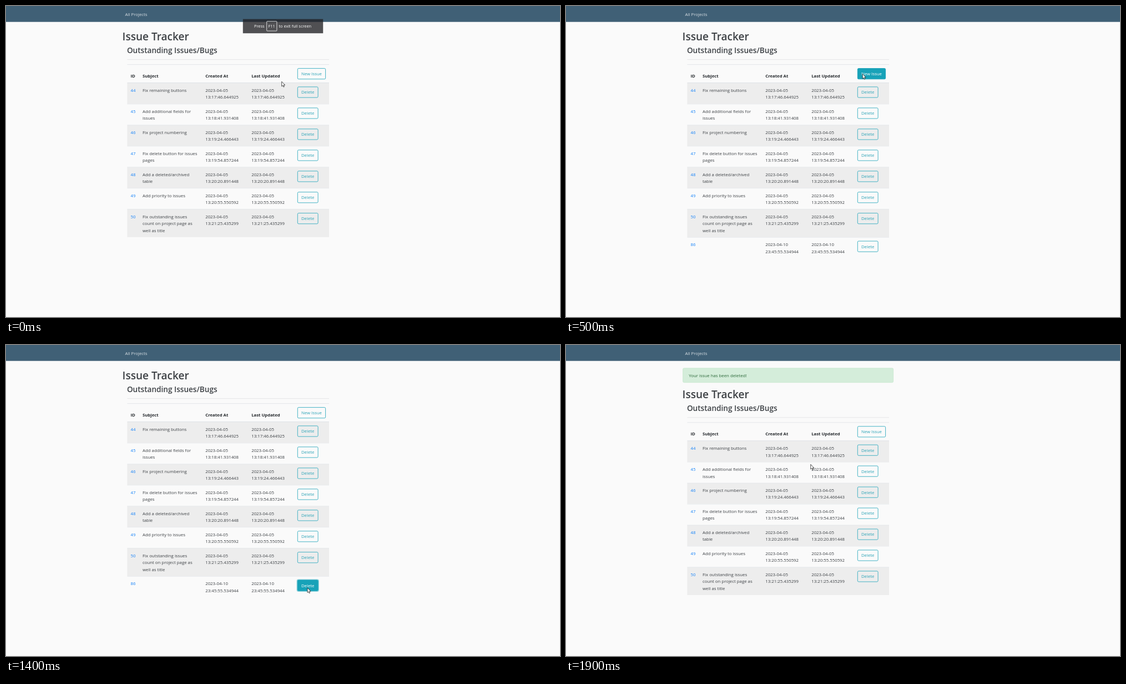
Write an HTML page that moves like this. It is 998x561 px and loops after 2 s.

```html
<!DOCTYPE html>
<html lang="en">
<head>
<meta charset="utf-8">
<title>Issue Tracker</title>
<style>
  html, body { margin: 0; width: 100%; height: 100%; overflow: hidden; background: #fafafa; }
  svg { display: block; }
  text { font: 7.82px "Open Sans", "Noto Sans", sans-serif; fill: #3d4145; white-space: pre; }
  .title { font-size: 19.05px; font-weight: 600; }
  .sub { font-size: 13.6px; font-weight: 600; }
  .head { font-size: 7.76px; font-weight: 700; fill: #25292d; }
  .link { fill: #1783f8; }
  .nav { fill: #d9e0e5; }
  .note { fill: #2b6839; }
  .tip { font-size: 7.4px; fill: #fff; }
  .btn rect { fill: transparent; stroke: #32abbf; stroke-width: .9; }
  .btn text { fill: #2ba3b7; }
  .btn.hover rect { fill: #17a2b8; stroke: #17a2b8; }
  .btn.hover text { fill: #fff; }
  .btn .halo, .btn.hover .halo { fill: #8bd0db; stroke: none; visibility: hidden; }
  .btn.focus .halo { visibility: visible; }
</style>
</head>
<body>
<svg id="stage" width="998" height="561" viewBox="0 0 998 561" xmlns="http://www.w3.org/2000/svg"></svg>
<script>
(() => {
  const NS = "http://www.w3.org/2000/svg";
  const stage = document.getElementById("stage");

  function el(parent, tag, attrs = {}, content) {
    const node = document.createElementNS(NS, tag);
    for (const key in attrs) node.setAttribute(key, attrs[key]);
    if (content !== undefined) node.textContent = content;
    parent.appendChild(node);
    return node;
  }
  const group = (parent, cls = "") => el(parent, "g", { class: cls });
  const rect = (parent, x, y, width, height, fill, more = {}) =>
    el(parent, "rect", { x, y, width, height, fill, ...more });
  const label = (parent, x, y, str, cls = "") => el(parent, "text", { x, y, class: cls }, str);

  function button(parent, y, width, str) {
    const g = group(parent, "btn");
    const x = 525.3, height = 19.2;
    rect(g, x - 1.7, y - 1.7, width + 3.4, height + 3.4, "none", { rx: 3, class: "halo" });
    rect(g, x, y, width, height, "none", { rx: 1.9 });
    label(g, x + 6.6, y + 12.5, str);
    return { g, x, y, width, height };
  }

  const LINE = 12.48, PAD = 13, EDGE = "#dee2e6";
  const issues = [
    [44, ["Fix remaining buttons"], "2023-04-05", "13:17:46.644925"],
    [45, ["Add additional fields for", "issues"], "2023-04-05", "13:18:41.931408"],
    [46, ["Fix project numbering"], "2023-04-05", "13:19:24.466443"],
    [47, ["Fix delete button for issues", "pages"], "2023-04-05", "13:19:54.857244"],
    [48, ["Add a deleted/archived", "table"], "2023-04-05", "13:20:20.891448"],
    [49, ["Add priority to issues"], "2023-04-05", "13:20:55.550592"],
    [50, ["Fix outstanding issues", "count on project page as", "well as title"], "2023-04-05", "13:21:25.435299"],
    [86, [], "2023-04-10", "23:45:55.534944"]
  ];

  rect(stage, 0, 0, 998, 561, "#fafafa");
  rect(stage, 0, 0, 998, 28.7, "#406076");
  label(stage, 214.6, 17.7, "All Projects", "nav");

  const alertBox = group(stage);
  rect(alertBox, 210.6, 41.8, 379, 25.8, "#d4edda", { rx: 2, stroke: "#c3e6cb", "stroke-width": .7 });
  label(alertBox, 221.3, 57.8, "Your issue has been deleted!", "note");

  const page = group(stage);
  label(page, 209.6, 62.2, "Issue Tracker", "title");
  label(page, 217.9, 85.2, "Outstanding Issues/Bugs", "sub");
  rect(page, 218.4, 96.3, 363.6, .8, "#e1e2e3");
  rect(page, 218.4, 105.3, 363.6, .8, EDGE);
  [[224.5, "ID"], [246, "Subject"], [359.2, "Created At"], [442.2, "Last Updated"]]
    .forEach(([x, str]) => label(page, x, 129, str, "head"));
  const newButton = button(page, 112.6, 50.3, "New Issue");

  function issueRow(y, i) {
    const [id, subject, day, time] = issues[i];
    const g = group(page);
    const height = PAD + LINE * Math.max(2, subject.length);
    if (i % 2 === 0) rect(g, 218.4, y, 363.6, height, i < 7 ? "#ededed" : "none");
    rect(g, 218.4, y - (i ? 0 : .6), 363.6, i ? .6 : 1, EDGE);
    const base = y + 16.2;
    label(g, 224.5, base, id, "link");
    subject.forEach((str, n) => label(g, 246, base + n * LINE, str));
    for (const x of [359.2, 442.2]) {
      label(g, x, base, day);
      label(g, x, base + LINE, time);
    }
    return { g, height, del: button(g, y + 7.2, 36.8, "Delete") };
  }
  let rowY = 138.7, last;
  issues.forEach((_, i) => {
    last = issueRow(rowY, i);
    rowY += last.height;
  });

  const hint = group(stage);
  rect(hint, 426.8, 23.6, 144.4, 25.6, "#202124", { opacity: .78 });
  label(hint, 447, 39, "Press", "tip");
  rect(hint, 469.7, 27.6, 18.2, 17.4, "none", { rx: 1, stroke: "#fff", "stroke-width": .8 });
  label(hint, 472.4, 39, "F11", "tip");
  label(hint, 491.4, 39, "to exit full screen", "tip");

  const cursor = el(stage, "path", {
    d: "M0 0V8.6L1.9 6.9L3.2 9.8L4.6 9.2L3.4 6.3H6Z",
    fill: "#fff", stroke: "#222", "stroke-width": .8, "stroke-linejoin": "round"
  });

  // time, x, y of the pointer tip
  const path = [
    [0, 496.7, 136.3], [300, 534.2, 122.5], [500, 534.2, 122.5], [700, 506.3, 418],
    [1000, 543, 438], [1400, 543, 438], [1500, 438, 355.4], [1900, 440.8, 215.4]
  ];

  function pointer(t) {
    let i = 0;
    while (i < path.length - 2 && t >= path[i + 1][0]) i++;
    const [t0, x0, y0] = path[i], [t1, x1, y1] = path[i + 1];
    const k = Math.min(1, (t - t0) / (t1 - t0));
    return [x0 + (x1 - x0) * k, y0 + (y1 - y0) * k];
  }

  const show = (node, on) => node.setAttribute("display", on ? "inline" : "none");

  function paint(btn, x, y, focus) {
    const over = x >= btn.x && x <= btn.x + btn.width && y >= btn.y && y <= btn.y + btn.height;
    btn.g.setAttribute("class", "btn" + (over ? " hover" : "") + (focus ? " focus" : ""));
  }

  function render(ms) {
    const t = Math.floor(ms % 2000 / 100) * 100;
    const [x, y] = pointer(t);
    const deleted = t >= 1500;
    const shift = deleted ? 34.2 : 0;
    show(hint, t < 100);
    show(alertBox, deleted);
    show(last.g, t >= 500 && !deleted);
    page.setAttribute("transform", `translate(0 ${shift})`);
    paint(newButton, x, y - shift, t === 400);
    paint(last.del, x, y - shift, t === 1400);
    cursor.setAttribute("transform", `translate(${x} ${y})`);
  }

  const start = performance.now();
  function tick() {
    render(performance.now() - start);
    requestAnimationFrame(tick);
  }
  tick();
})();
</script>
</body>
</html>
```
